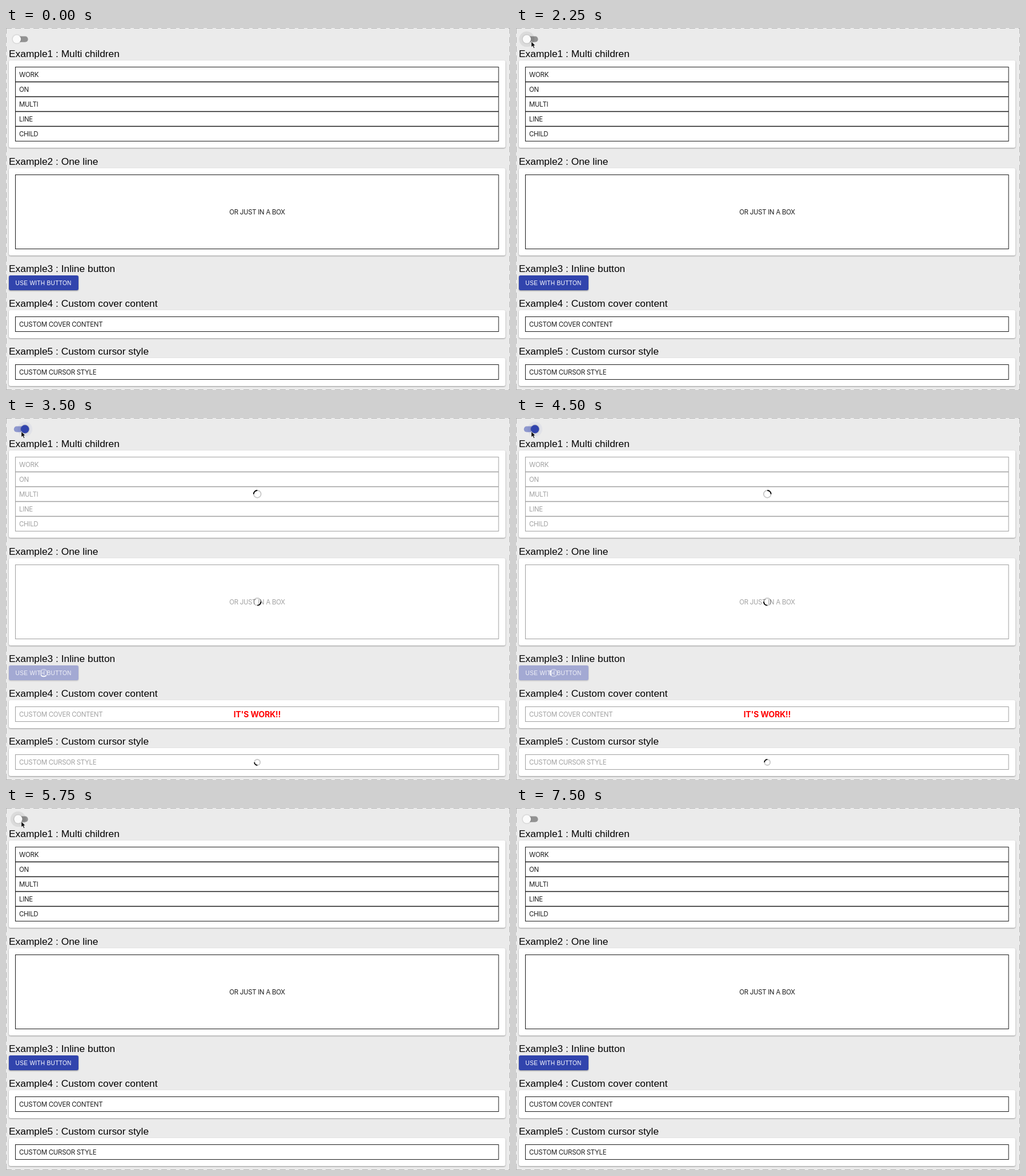
An HTML page that plays this animation: 883 by 635 pixels, repeating every 8250 ms.

```html
<!DOCTYPE html>
<html lang="en">
<head>
<meta charset="utf-8">
<title>Loading cover examples</title>
<style>
  html, body { margin: 0; width: 100%; height: 100%; overflow: hidden; background: #ebebeb; }
  svg { display: block; width: 883px; height: 635px; }
  .edge { fill: none; stroke: #b4b4b4; stroke-dasharray: 10 6; }
  .heading { font: 17.38px "Liberation Sans", Arial, sans-serif; }
  .label { font: 11.5px Inter, sans-serif; letter-spacing: -.3px; fill: #1c1c1c; }
  .button { font: 10.15px "Liberation Sans", Arial, sans-serif; letter-spacing: .29px; fill: #fff; }
  .notice { font: bold 14px Inter, sans-serif; letter-spacing: -.15px; fill: #f00; }
  .middle { text-anchor: middle; }
  .card { fill: #fff; filter: drop-shadow(0 1px .8px rgba(0, 0, 0, .36)); }
  .box { fill: none; stroke: #1a1a1a; }
  .rule { stroke: #1a1a1a; stroke-width: 1.5; }
  #buttonFace { fill: #3144ad; filter: drop-shadow(0 1px 1.1px rgba(0, 0, 0, .4)); }
  #thumb { filter: drop-shadow(0 .8px .8px rgba(0, 0, 0, .3)); }
  .loading #content { opacity: .41; }
  .loading #buttonFace { fill: #a3a9d3; filter: drop-shadow(0 1px 1px rgba(0, 0, 0, .2)); }
  .loading .button { fill: #f1f2f8; }
  #cover { visibility: hidden; }
  .loading #cover { visibility: visible; }
  .spinner { fill: none; stroke-width: 1.8; }
</style>
</head>
<body>
<svg id="stage" viewBox="0 0 883 635">
  <rect width="883" height="635" fill="#ebebeb"/>
  <path class="edge" d="M0 .5H883M0 634.5H883M.5 0V635M882.5 0V635"/>
  <g id="cards"></g>
  <g id="headings"></g>
  <g id="content"></g>
  <rect id="buttonFace" x="5" y="434" width="122" height="26" rx="3"/>
  <text class="button" x="16.6" y="451">USE WITH BUTTON</text>
  <g id="cover">
    <text class="notice middle" x="440" y="525.2">IT'S WORK!!</text>
  </g>
  <rect id="track" x="13.8" y="14.6" width="24.8" height="10.1" rx="5.05"/>
  <circle id="halo" cy="19.6"/>
  <circle id="thumb" cy="19.6" r="7.25"/>
  <path id="cursor" d="M0 0V10.2L2.4 8L4.1 11.9L6 11.1L4.3 7.3H7.4Z"
        fill="#000" stroke="#fff" stroke-width=".8" stroke-linejoin="round"/>
</svg>
<script>
const LOOP = 8250, STEP = 250, TURN = 800, SHOWN_AT = 2500;
const $ = id => document.getElementById(id);

function add(parent, tag, attrs, text = '') {
  const node = document.createElementNS('http://www.w3.org/2000/svg', tag);
  for (const key in attrs) node.setAttribute(key, attrs[key]);
  node.textContent = text;
  return parent.appendChild(node);
}
const heading = (text, y) => add($('headings'), 'text', { class: 'heading', x: 5, y }, text);
const label = (text, y) => add($('content'), 'text', { class: 'label', x: 23, y }, text);

function card(y, height) {
  add($('cards'), 'rect', { class: 'card', x: 5, y, width: 870, height, rx: 3 });
  add($('content'), 'rect', { class: 'box', x: 16.5, y: y + 11.5, width: 846.5, height: height - 23 });
}

heading('Example1 : Multi children', 51);
heading('Example2 : One line', 239.7);
heading('Example3 : Inline button', 428.4);
heading('Example4 : Custom cover content', 489.4);
heading('Example5 : Custom cursor style', 573.4);

card(57, 153);
card(246, 153);
card(495, 49);
card(579, 49);

['WORK', 'ON', 'MULTI', 'LINE', 'CHILD'].forEach((word, i) => {
  label(word, 85.6 + 26.1 * i);
  if (i) add($('content'), 'path', { class: 'rule', d: `M16.5 ${68.5 + 26 * i}H863` });
});
add($('content'), 'text', { class: 'label middle', x: 440, y: 326.6 }, 'OR JUST IN A BOX');
label('CUSTOM COVER CONTENT', 524.1);
label('CUSTOM CURSOR STYLE', 608.1);

// x, y, radius, colour, direction of the arc when the cover appears
const spinners = [
  [440.3, 133.4, 6.4, '#000', 225],
  [440.3, 322.3, 6.4, '#000', 45],
  [66, 447.2, 6.2, '#fff', 90],
  [440.3, 604, 5, '#000', 135]
].map(([x, y, r, stroke, start]) => {
  const group = add($('cover'), 'g', { class: 'spinner', stroke });
  add(group, 'circle', { r, 'stroke-opacity': stroke === '#000' ? .22 : .4 });
  add(group, 'circle', { r, pathLength: 4, 'stroke-dasharray': '1 3' });
  return angle =>
    group.setAttribute('transform', `translate(${x} ${y}) rotate(${start - 135 + angle})`);
});

const OFF = 18.9, ON = 33.2;
const none = 'none', hover = 'rgba(0,0,0,.035)', press = 'rgba(0,0,0,.065)';
const blueHover = 'rgba(49,68,173,.05)', bluePress = 'rgba(49,68,173,.2)';
const rest = [26.8, 23.6];

// time, cursor position, thumb x, halo colour, halo radius
const steps = [
  [0, null, OFF, none, 13],
  [250, [258, 32], OFF, none, 13],
  [500, [150, 30], OFF, none, 13],
  [750, [68, 27], OFF, none, 13],
  [1000, [40, 25], OFF, none, 13],
  [1500, rest, OFF, hover, 12.5],
  [2250, rest, OFF, press, 13.5],
  [2500, rest, ON, bluePress, 12],
  [2750, rest, ON, blueHover, 13],
  [5750, rest, 21.3, press, 13.5],
  [6000, rest, OFF, hover, 13],
  [6500, [60, 27], OFF, none, 13],
  [6750, null, OFF, none, 13]
];

function set(id, attrs) {
  for (const key in attrs) $(id).setAttribute(key, attrs[key]);
}

function draw(now) {
  const time = Math.floor(now % LOOP / STEP) * STEP;
  const [, cursor, x, haloFill, r] = steps.findLast(step => step[0] <= time);
  const on = x === ON;
  $('stage').classList.toggle('loading', on);
  set('track', { fill: on ? '#8f98ce' : '#929292' });
  set('thumb', { cx: x, fill: on ? '#3144ad' : '#fafafa' });
  set('halo', { cx: x, r, fill: haloFill });
  set('cursor', cursor
    ? { visibility: 'visible', transform: `translate(${cursor})` }
    : { visibility: 'hidden' });
  spinners.forEach(turn => turn((time - SHOWN_AT) / TURN * 360));
}

const begin = performance.now();
function tick() {
  draw(performance.now() - begin);
  requestAnimationFrame(tick);
}
tick();
</script>
</body>
</html>
```
